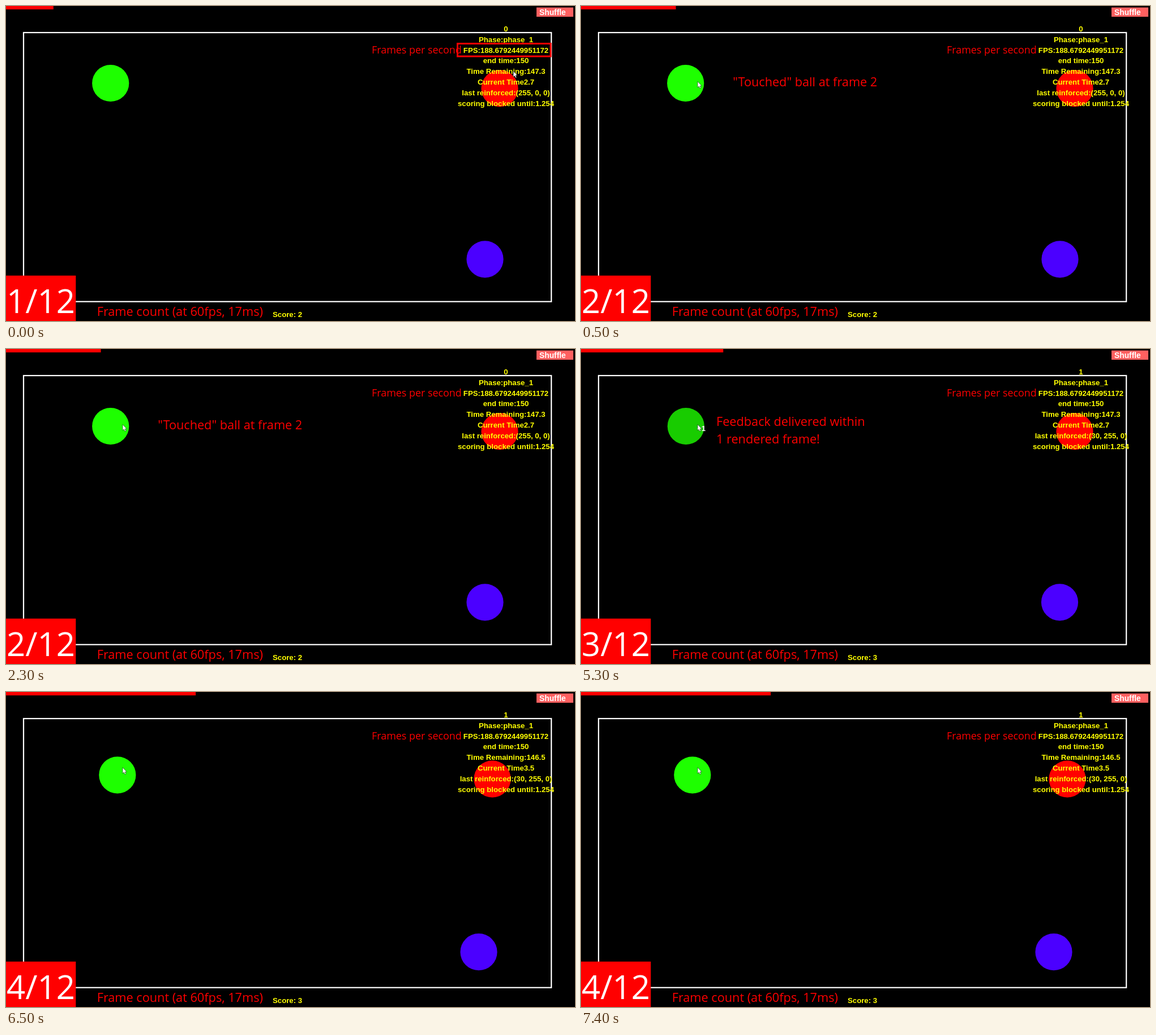
An HTML page that plays this animation: 1005x557 px, repeating every 8 s.

```html
<!DOCTYPE html>
<html lang="en">
<head>
<meta charset="utf-8">
<title>Feedback timing</title>
<style>
  html, body { margin: 0; width: 100%; height: 100%; overflow: hidden; background: #000; }
  svg { display: block; width: 1005px; height: 557px; }
  text { white-space: pre; }
  .note { font: 21.7px "Open Sans", "Noto Sans", sans-serif; fill: #f00; }
  .small { font-size: 17.9px; }
  .count { font: 58px "Open Sans", "Noto Sans", sans-serif; fill: #fff; text-anchor: middle; }
  .hud { font: bold 13.2px "Liberation Sans", Arial, sans-serif; fill: #ff0; }
  .mid { text-anchor: middle; }
  .white { fill: #fff; }
</style>
</head>
<body>
<svg viewBox="0 0 1005 557">
  <rect width="1005" height="557"/>
  <rect x="31" y="47" width="932.2" height="475.7" fill="none" stroke="#fff" stroke-width="2.2"/>
  <rect id="bar" height="6" fill="#f00"/>
  <rect x="937" y="2.6" width="65" height="16.4" fill="#ff6060"/>
  <text class="hud white" x="942" y="16" style="font-size:13.8px">Shuffle</text>

  <circle id="green" r="32.6"/>
  <circle id="red" r="32.6" fill="#f00"/>
  <circle id="blue" r="32.6" fill="#4b00ff"/>

  <g id="stats" class="hud mid"></g>
  <text id="score" class="hud" x="471" y="549.7"></text>
  <text id="plus" class="hud white" x="205" y="145">+1</text>
  <path id="cursor" d="M0 0V10.5L2.4 8.4L4 12L5.8 11.2L4.3 7.7H7.3Z" fill="#fff" stroke="#000" stroke-width=".5"/>

  <text class="note small" x="646" y="84">Frames per second</text>
  <rect id="box" x="797.5" y="66.5" width="164.5" height="22.5" fill="none" stroke="#f00" stroke-width="3"/>
  <text class="note" x="160.7" y="548">Frame count (at 60fps, 17ms)</text>
  <g id="notes" class="note"></g>

  <rect y="476.7" width="123.3" height="81" fill="#f00"/>
  <text id="count" class="count" x="61.5" y="543"></text>
</svg>
<script>
const LOOP = 8000;
const $ = id => document.getElementById(id);

const base = {
  green: [184.7, 136.5], red: [872, 145.7], blue: [846, 447.8],
  shade: '#1eff00', cursor: [206, 133.5],
  hits: 0, now: 2.7, last: '(255, 0, 0)', notes: []
};
const touched = { ...base, notes: [[268.3, 141.5, '"Touched" ball at frame 2']] };
const scored = {
  ...base, hits: 1, last: '(30, 255, 0)', shade: '#18cc00',
  green: [185.3, 136.5], blue: [845.5, 447.8], plus: true,
  notes: [[239, 136, 'Feedback delivered within'], [239, 167, '1 rendered frame!']]
};
const moved = {
  ...scored, now: 3.5, shade: '#1eff00', plus: false, notes: [],
  green: [196.8, 146.8], red: [859, 153.8], blue: [835, 459.7]
};

const steps = [
  { at: 0, ...base, cursor: [896, 115], box: true },
  { at: 500, ...touched },
  { at: 3500, ...scored },
  { at: 6500, ...moved }
];

const place = (id, [x, y]) => $(id).setAttribute('transform', `translate(${x} ${y})`);
const show = (id, on) => $(id).setAttribute('visibility', on ? 'visible' : 'hidden');
const label = (x, y, s) => `<text x="${x}" y="${y}">${s}</text>`;

function draw(i) {
  const s = steps[i];
  ['green', 'red', 'blue', 'cursor'].forEach(id => place(id, s[id]));
  $('green').setAttribute('fill', s.shade);
  $('bar').setAttribute('width', 1005 / 12 * (i + 1));
  $('count').textContent = `${i + 1}/12`;
  $('score').textContent = `Score: ${2 + s.hits}`;
  $('stats').innerHTML = [
    s.hits,
    'Phase:phase_1',
    'FPS:188.6792449951172',
    'end time:150',
    `Time Remaining:${(150 - s.now).toFixed(1)}`,
    `Current Time${s.now}`,
    `last reinforced:${s.last}`,
    'scoring blocked until:1.254'
  ].map((line, n) => label(883, 44.6 + 18.95 * n, line)).join('');
  $('notes').innerHTML = s.notes.map(n => label(...n)).join('');
  show('plus', s.plus);
  show('box', s.box);
}

let shown = -1;
const start = performance.now();
function tick() {
  const t = (performance.now() - start) % LOOP;
  const i = steps.filter(s => s.at <= t).length - 1;
  if (i !== shown) draw(shown = i);
  requestAnimationFrame(tick);
}
tick();
</script>
</body>
</html>
```
